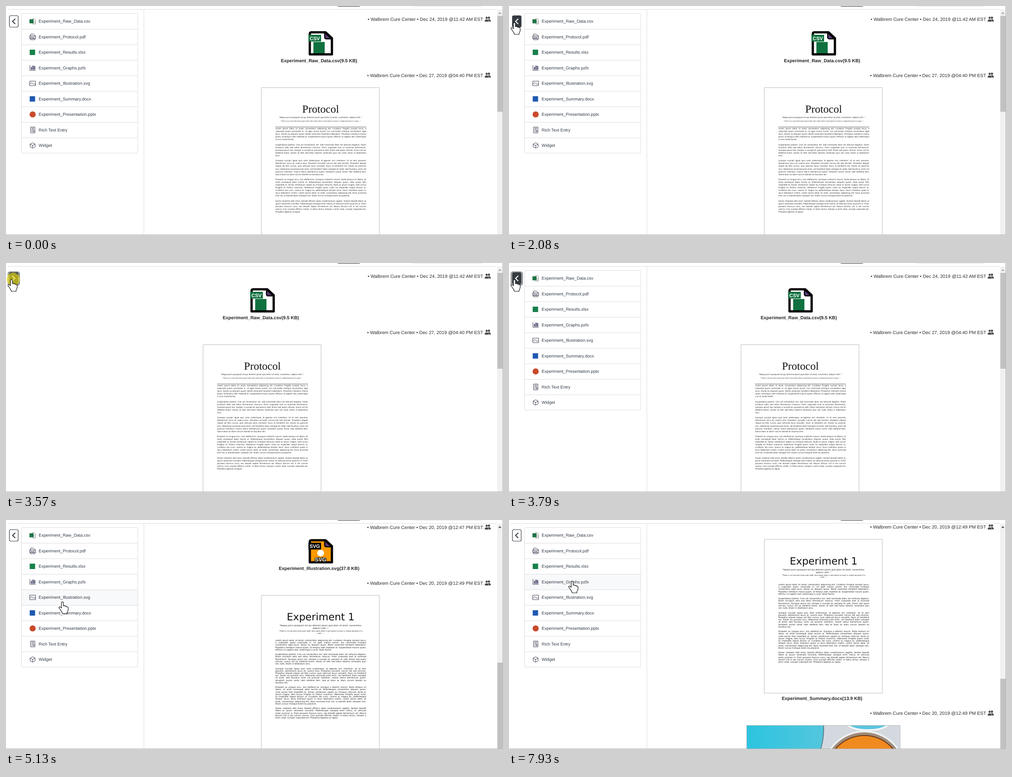
An HTML page that plays this animation: 1101x509 px, repeating every 8 s.

```html
<!DOCTYPE html>
<html lang="en">
<head>
<meta charset="utf-8">
<title>File browser</title>
<style>
html, body { margin: 0; width: 100%; height: 100%; overflow: hidden; background: #fff; }
svg { display: block; width: 100vw; height: 100vh; }
svg, .body { text-rendering: geometricPrecision; }
text { font-family: "Liberation Sans", Arial, sans-serif; }
.row { font-size: 9.5px; fill: #333d49; }
.meta { font-size: 10.3px; fill: #2b2b2b; }
.label { font-size: 10.24px; font-weight: bold; fill: #212529; text-anchor: middle; }
.doc text { text-anchor: middle; fill: #111; }
.proto, .proto text { font-family: "Open Sans", sans-serif; }
.exper, .exper text { font-family: "DejaVu Sans", sans-serif; }
.doc .serif { font-family: "Liberation Serif", serif; }
.body { font-size: 4.48px; color: #111; white-space: nowrap; }
.line { display: flex; justify-content: space-between; }
.thin { fill: none; stroke: #3f3f55; stroke-width: 1; }
</style>
</head>
<body>
<svg viewBox="0 0 1101 509">
  <defs>
    <clipPath id="pane"><rect y="8" width="1087" height="500"/></clipPath>
    <clipPath id="photoClip"><rect x="527" y="457" width="340" height="60"/></clipPath>
    <linearGradient id="cyan"><stop stop-color="#0fc3e2"/><stop offset="1" stop-color="#53c6dd"/></linearGradient>
    <g id="people" fill="#4a4a4a">
      <circle cx="9.8" cy="3" r="2.5"/><path d="M6 11.5Q6 6.4 10 6.4T14 11.5Z"/>
      <g stroke="#fff" stroke-width=".6"><circle cx="4.8" cy="3.2" r="2.7"/><path d="M0 12Q0 6.6 4.8 6.6T9.6 12Z"/></g>
    </g>
    <g id="sheet" stroke="#000">
      <path d="M3 51.5V6Q3 2.5 6.500 2.500H38L52 15.500V51.500Z" stroke-width="5" stroke-linejoin="round"/>
      <path d="M36 3V13Q36 17 40 17H51Z" fill="#5d3a78" stroke-width="2.500"/>
    </g>
  </defs>

  <path d="M3 7.500H1087" stroke="#dcdcdc"/>
  <path d="M734 0H785Q784 1.200 781 1.200H738Q735 1.200 734 0Z" fill="#555"/>
  <path d="M903 .2H1054" stroke="#ccc" stroke-width=".8"/>

  <g clip-path="url(#pane)">
    <g id="first"></g>
    <g id="second"></g>
  </g>
  <g id="sidebar"></g>
  <g id="button">
    <rect id="ring" x="5" y="20" width="24.500" height="29" rx="4" fill="none" stroke="#85888c" stroke-width="2.500"/>
    <rect id="key" x="7.500" y="21.500" width="19.500" height="25.500" rx="3" stroke="#343a40" stroke-width="1.200"/>
    <path id="chevron" fill="none" stroke-width="2"/>
  </g>

  <rect x="1088" y="8" width="12" height="500" fill="#f1f1f1"/>
  <path id="up" d="M1090.500 17.500H1097.500L1094 13.500Z"/>
  <rect id="thumb" x="1088.500" width="11.500" fill="#c1c1c1"/>
  <path d="M0 508.500H1100.500V0" fill="none" stroke="#b4b4b4"/>

  <circle id="click" r="14.500" fill="#f5e614" fill-opacity=".64"/>
  <g id="cursor" fill="#fff" stroke="#111" stroke-width="1.200" stroke-linejoin="round">
    <path id="arrow" d="M0 0V18.500L4.300 14.800 7.500 22 10.500 20.700 7.400 13.700H13.500Z"/>
    <path id="hand" d="M-2.200 13.500V2a2.200 2.200 0 0 1 4.400 0V9c1-1.200 3.700-.6 4 .9 1.200-.8 3.300-.2 3.600 1.200 1.500-.6 3 .4 3 2V17c0 3-2 4.500-2.400 6.500V26H0C-.8 22.500-3 20-4.500 17.500L-7.500 13.400c-1-1.800 1.300-3.400 3-2Z"/>
  </g>
</svg>

<script>
const $ = id => document.getElementById(id);
const ROW_TOP = 17, ROW_HEIGHT = 34.5;

// "|" breaks a line on the protocol page, "/" on the summary page.
const paragraphs = [
  `Lorem ipsum dolor sit amet, consectetur adipiscing elit. Curabitur fringilla suscipit lacus,/ a| vulputate quam commodo in. Ut eget massa auctor nisi commodo tristique/ consectetur eget| lacus. Donec eu aliquam quam. Morbi venenatis hendrerit bibendum./ Phasellus interdum massa| quam, id tempus nibh molestie at. Suspendisse mauris quam,/ efficitur ut sagittis sed, scelerisque| a urna. Nulla facilisi.`,
  `Suspendisse potenti. Cras vel consectetur est. Sed commodo diam vel vehicula dapibus./ Etiam| tincidunt odio sed tellus fermentum rhoncus. Proin vulputate erat ut euismod/ fermentum.| Quisque ipsum dui, tempor a suscipit et, posuere et velit. Etiam sed quam/ ultrices, luctus nisl id,| eleifend lorem. Donec id nibh sed tellus lobortis venenatis quis/ nec nulla. Etiam in bibendum| arcu.`,
  `Quisque suscipit ligula quis ante scelerisque, id egestas orci interdum. Ut et sem/ posuere,| elementum lacus et, viverra eros. Phasellus convallis rutrum elit sed ultricies./ Phasellus aliquet| neque vel felis cursus, quis vehicula lacus convallis. Nunc at hendrerit/ est. Donec eu pulvinar| arcu. Maecenas euismod justo enim, vel hendrerit diam volutpat/ sit amet. Sed faucibus, enim vel| pulvinar interdum, massa metus elementum quam,/ hendrerit auctor tortor nibh eleifend felis.| Sed at diam ac diam rutrum blandit eu/ faucibus leo.`,
  `Praesent ac congue arcu, non eleifend ex. Quisque a lobortis mauris. Nulla tempus mi/ libero, sit| amet consequat dolor lacinia ut. Pellentesque consectetur aliquam quam,/ vitae auctor felis| imperdiet et. Donec vestibulum sapien eu tristique vehicula. Nulla ac/ ipsum magna. Sed cursus| fringilla mi finibus maximus. Maecenas fringilla quam nulla,/ eu imperdiet neque dictum ut.| Curabitur leo nunc, viverra ac magna eu, pellentesque/ tempor lacus. Nunc interdum quam in| lacus bibendum mattis. Lorem ipsum dolor sit/ amet, consectetur adipiscing elit. Nunc euismod| erat nisl, ut blandit dolor volutpat non./ Etiam cursus tristique lorem eu placerat.`,
  `Donec molestie nibh enim, blandit efficitur dolor condimentum sagittis. Nullam blandit/ libero ac| ipsum venenatis convallis. Pellentesque volutpat enim metus, et vehicula/ tortor pulvinar in. Proin| posuere rhoncus nunc, nec blandit sapien fermentum vel. Mauris/ dictum nisl in est rutrum| viverra. Cras suscipit efficitur mollis. In tellus lectus, tempor a/ enim vitae, suscipit vulputate est.| Phasellus egestas ac ligula.`
];

function justified(mark, top, lineHeight, gap) {
  const line = (text, i, all) => {
    const words = text.trim().replace(/[|/]/g, '');
    const parts = i < all.length - 1 ? words.split(' ') : [words];
    return `<div class="line">${parts.map(w => `<span>${w}</span>`).join('')}</div>`;
  };
  const blocks = paragraphs.map(p =>
    `<div style="margin-bottom:${gap}px">${p.split(mark).map(line).join('')}</div>`);
  return `<foreignObject x="596.500" y="${top}" width="201.500" height="230">
    <div class="body" style="line-height:${lineHeight}px">${blocks.join('')}</div></foreignObject>`;
}

const centred = (y, size, text, attrs = '') =>
  `<text x="697" y="${y}" font-size="${size}" ${attrs}>${text}</text>`;
const label = (y, text) => `<text class="label" x="693.500" y="${y}">${text}</text>`;
const header = (y, when) => `<g transform="translate(0 ${y})">
  <text class="meta" x="1057" y="4" text-anchor="end">• Walbrem Cure Center • ${when} EST</text>
  <use href="#people" x="1060" y="-6"/></g>`;
const paper = (y, height) =>
  `<rect x="565.500" y="${y}" width="261.500" height="${height}" fill="#fff" stroke="#bcbcbc"/>`;
const fileIcon = (y, fill, tagFill, tag, emblem) => `<g transform="translate(670 ${y})">
  <use href="#sheet" fill="${fill}"/><rect y="8" width="28" height="15" fill="${tagFill}"/>
  <text x="14" y="19.500" font-size="11" font-weight="bold" fill="#fff" text-anchor="middle">${tag}</text>${emblem}</g>`;

const toolbar = [
  [332, '<path d="M-8 9L-7 4 3-6 7-2-3 8ZM4-7L6-9 9.500-6 9-4 8-3Z"/>'],
  [364, '<path d="M0-8V7M-7.500 0L0 7.500 7.500 0" fill="none" stroke="#444" stroke-width="3.200"/>'],
  [396, '<path d="M0 8V-7M-7.500 0L0-7.500 7.500 0" fill="none" stroke="#444" stroke-width="3.200"/>'],
  [427, '<path d="M-8-8H0L8.500 0Q9.500 1 8.500 2L3 8Q2 9 1 8L-8 0Z"/><circle cx="-5" cy="-5" r="1.500" fill="#f7f2fb"/>'],
  [459, '<g transform="rotate(45)" fill="none" stroke="#444" stroke-width="2.200"><rect x="-11" y="-3.500" width="12" height="7" rx="3.500"/><rect x="-1" y="-3.500" width="12" height="7" rx="3.500"/></g>'],
  [492, '<path d="M-5 5.200A9.300 7 0 1 1 0 6.500Q-4 9.500-8 9.300-5.500 8-5 5.200Z" fill="none" stroke="#444" stroke-width="1.700"/>'],
  [523, '<circle r="4.800" fill="none" stroke="#444" stroke-width="4"/><circle r="7.500" fill="none" stroke="#444" stroke-width="3" stroke-dasharray="2.945"/>']
];

$('first').innerHTML = `
  <g id="hovered"><rect x="319" y="22" width="755" height="109.500" fill="#f7f2fb"/>
    <path d="M319 22.500H1074" stroke="#d9d3de" stroke-dasharray="3 2"/>
    <g fill="#444">${toolbar.map(([x, art]) => `<g transform="translate(${x} 35)">${art}</g>`).join('')}
    <path d="M535.500 33H542L538.800 36.500Z"/></g></g>
  ${header(29, 'Dec 24, 2019 @11:42 AM')}
  ${header(153.5, 'Dec 27, 2019 @04:40 PM')}
  <g id="middle">
    ${fileIcon(56, '#fff', '#10713f', 'CSV', '<rect x="11" y="24" width="25" height="25" fill="#10713f"/>')}
    ${label(124.5, 'Experiment_Raw_Data.csv(9.5 KB)')}
    <g class="doc proto">${paper(181.5, 340)}
      ${centred(237, 24, 'Protocol', 'class="serif"')}
      ${centred(249, 4.4, '"Neque porro quisquam est qui dolorem ipsum quia dolor sit amet, consectetur, adipisci velit..."', 'font-style="italic"')}
      ${centred(256.5, 3.65, '"There is no one who loves pain itself, who seeks after it and wants to have it, simply because it is pain..."')}
      <path d="M596.500 269H798" stroke="#333" stroke-width=".8"/>
      ${justified('|', 270, 6.07, 5.35)}
    </g>
  </g>`;

$('second').innerHTML = `
  ${header(15.5, 'Dec 20, 2019 @12:47 PM')}
  ${fileIcon(42.5, '#ff9a00', '#000', 'SVG', `<circle cx="27" cy="31" r="7.500" fill="#fff"/>
    <text x="27" y="49" font-size="12" font-weight="bold" text-anchor="middle" fill="#fff" stroke="#000" stroke-width="2" paint-order="stroke">SVG</text>`)}
  ${label(110.5, 'Experiment_Illustration.svg(37.8 KB)')}
  ${header(139.8, 'Dec 20, 2019 @12:49 PM')}
  <g class="doc exper">${paper(167.5, 342)}
    ${centred(223, 22.3, 'Experiment 1')}
    ${centred(236, 4.55, '"Neque porro quisquam est qui dolorem ipsum quia dolor sit amet, consectetur,', 'font-style="italic"')}
    ${centred(242, 4.55, 'adipisci velit..."', 'font-style="italic"')}
    ${centred(248, 3.75, '"There is no one who loves pain itself, who seeks after it and wants to have it, simply because it is')}
    ${centred(252.8, 3.75, 'pain..."')}
    ${justified('/', 265.9, 5.22, 5.22)}
  </g>
  ${label(524.5, 'Experiment_Summary.docx(13.9 KB)')}
  ${header(553.5, 'Dec 20, 2019 @12:49 PM')}
  <g transform="translate(0 124.500)"><g clip-path="url(#photoClip)">
    <rect x="527" y="457" width="340" height="60" fill="#d3d9df"/>
    <circle cx="547" cy="465" r="150" fill="url(#cyan)" stroke="#5b7f8c" stroke-width="2"/>
    <ellipse cx="795" cy="452" rx="45" ry="15" fill="#5cc4e0" stroke="#f2f5f7" stroke-width="4"/>
    <circle cx="787" cy="560" r="90" fill="#a08a78" stroke="#eef0f2" stroke-width="4"/>
    <circle cx="787" cy="562" r="83" fill="#f08a1f" stroke="#6b3a16" stroke-width="2"/>
  </g><rect x="526.500" y="456.500" width="340" height="60" fill="none" stroke="#bcbcbc"/></g>`;

const square = color => `<rect x="-6.500" y="-6" width="12" height="12" fill="${color}"/>`;
const rows = [
  ['Experiment_Raw_Data.csv', '<path class="thin" d="M-1-5.500H4L6.500-3V6H-1M2 0H5M2 3H5" style="stroke:#888"/><rect x="-7" y="-4.500" width="9" height="9" fill="#1d7445"/>'],
  ['Experiment_Protocol.pdf', '<path class="thin" d="M-4.500-1V-6H2L5-3V-1M-4.500 4V6.500H5V4"/><rect class="thin" x="-6.500" y="-2" width="13" height="6"/><text y="3" font-size="5" font-weight="bold" text-anchor="middle" fill="#3f3f55">PDF</text>'],
  ['Experiment_Results.xlsx', square('#17804a')],
  ['Experiment_Graphs.pzfx', '<path d="M-6-6V5.500H6.500" class="thin"/><path d="M-2.500 4V-2M1 4V-5M4.500 4V-4" stroke="#33335c" stroke-width="2.200"/>'],
  ['Experiment_Illustration.svg', '<path class="thin" d="M-6.500-5H6.500V5H-6.500ZM-6.500 2L-2-2 2 2 4 .5 6.500 3"/>'],
  ['Experiment_Summary.docx', square('#2059b0')],
  ['Experiment_Presentation.pptx', '<circle r="6.800" fill="#c8492b"/>'],
  ['Rich Text Entry', '<path class="thin" d="M-4.500-6.500H5V6.500H-4.500ZM-2.500-4H3M-2.500-1.500H3M-2.500 1H0M-2.500 3.500H0M1.500 1H3V4H1.500Z"/>'],
  ['Widget', '<path class="thin" d="M0-6L5.500-3V3L0 6-5.500 3V-3ZM-5.500-3L0 0 5.500-3M0 0V6"/>']
];
$('sidebar').innerHTML = `
  <path d="M305.500 8V508" stroke="#dedede"/>
  <rect id="hover" x="35" width="257" height="${ROW_HEIGHT}"/>
  <rect x="34.500" y="16.500" width="257.500" height="310.500" rx="3" fill="none" stroke="#dcdcdc"/>
  ${rows.map(([name, icon], i) => {
    const y = ROW_TOP + ROW_HEIGHT * i;
    return `${i ? `<path d="M35 ${y}H292" stroke="#dcdcdc"/>` : ''}
      <g transform="translate(59 ${y + 17})">${icon}<text class="row" x="13.300" y="3.200">${name}</text></g>`;
  }).join('')}`;

// Bursts of motion: start, end, number of steps.
const bursts = [[690, 1470, 11], [1540, 2080, 8], [2410, 2870, 7], [3570, 3940, 6], [4190, 4660, 7],
  [5040, 5130, 2], [5980, 6150, 3], [6390, 6450, 2], [7000, 7230, 4], [7540, 7930, 6]];
const pointerPath = [[690, 440, 438], [1080, 392, 125], [1470, 85, 33], [2080, 12, 37], [4115, 12, 37],
  [4347, 75, 96], [4660, 125, 182], [5900, 125, 182], [6150, 114, 205], [6925, 114, 205],
  [7230, 116, 235], [7450, 116, 235], [7930, 140, 136]];
const slidePath = [[2487, 0], [2717, -64.5], [2870, -129], [3570, -129], [3940, 0]];

function stepped(t) {
  const burst = bursts.findLast(b => t >= b[0]);
  if (!burst) return 0;
  const [start, end, count] = burst, step = (end - start) / (count - 1);
  return start + step * Math.min(count - 1, Math.floor((t - start) / step + 0.27));
}

function along(path, t) {
  const next = path.findIndex(p => p[0] > t);
  if (next <= 0) return path.at(next).slice(1);
  const a = path[next - 1], b = path[next], k = (t - a[0]) / (b[0] - a[0]);
  return a.slice(1).map((v, i) => v + (b[i + 1] - v) * k);
}

const show = (id, on) => $(id).setAttribute('display', on ? 'inline' : 'none');
const set = (id, attrs) => Object.entries(attrs).forEach(([k, v]) => $(id).setAttribute(k, v));

function draw(time) {
  const t = stepped(time);
  const [x, y] = along(pointerPath, t);
  const visible = t >= 690;
  const collapsed = t > 2450 && t < 3600;
  const pressed = [2410, 3570, 5040, 6390].some(c => t >= c && t < c + 30);
  const top = t < 5100, summary = t > 6430;

  show('first', top);
  show('second', !top);
  set('second', { transform: `translate(0 ${summary ? -124.5 : 0})` });
  const slide = t < 2487 || t >= 3940 ? 0 : along(slidePath, t)[0];
  set('middle', { transform: `translate(${slide} 0)` });
  show('hovered', visible && top && x > 319 && y < 131);
  show('sidebar', !collapsed);

  const row = Math.floor((y - ROW_TOP) / ROW_HEIGHT);
  const overRow = visible && !collapsed && x > 34 && x < 292 && row >= 0 && row < rows.length;
  show('hover', overRow);
  set('hover', { y: ROW_TOP + ROW_HEIGHT * row, fill: pressed ? '#e9ecef' : '#f8f9fa' });

  const overButton = visible && x < 28;
  show('ring', t >= 2410 && top);
  set('key', { fill: overButton ? '#343a40' : '#fff' });
  set('chevron', {
    d: collapsed ? 'M13.500 28.500L19.500 34.200 13.500 40' : 'M20.500 28.500L14.500 34.200 20.500 40',
    stroke: overButton ? '#fff' : '#343a40'
  });

  const thumbTop = top ? 22 : summary ? 353 : 317;
  set('thumb', { y: thumbTop, height: Math.min(213, 508 - thumbTop) });
  set('up', { fill: top ? '#a3a3a3' : '#505050' });

  show('cursor', visible);
  set('cursor', { transform: `translate(${x} ${y})` });
  show('hand', overRow || overButton);
  show('arrow', !overRow && !overButton);
  show('click', pressed);
  set('click', { cx: x + (overButton ? 4 : 0), cy: y + (overButton ? -1 : 2) });
}

const begin = performance.now();
function tick() {
  draw((performance.now() - begin) % 8000);
  requestAnimationFrame(tick);
}
tick();
</script>
</body>
</html>
```
